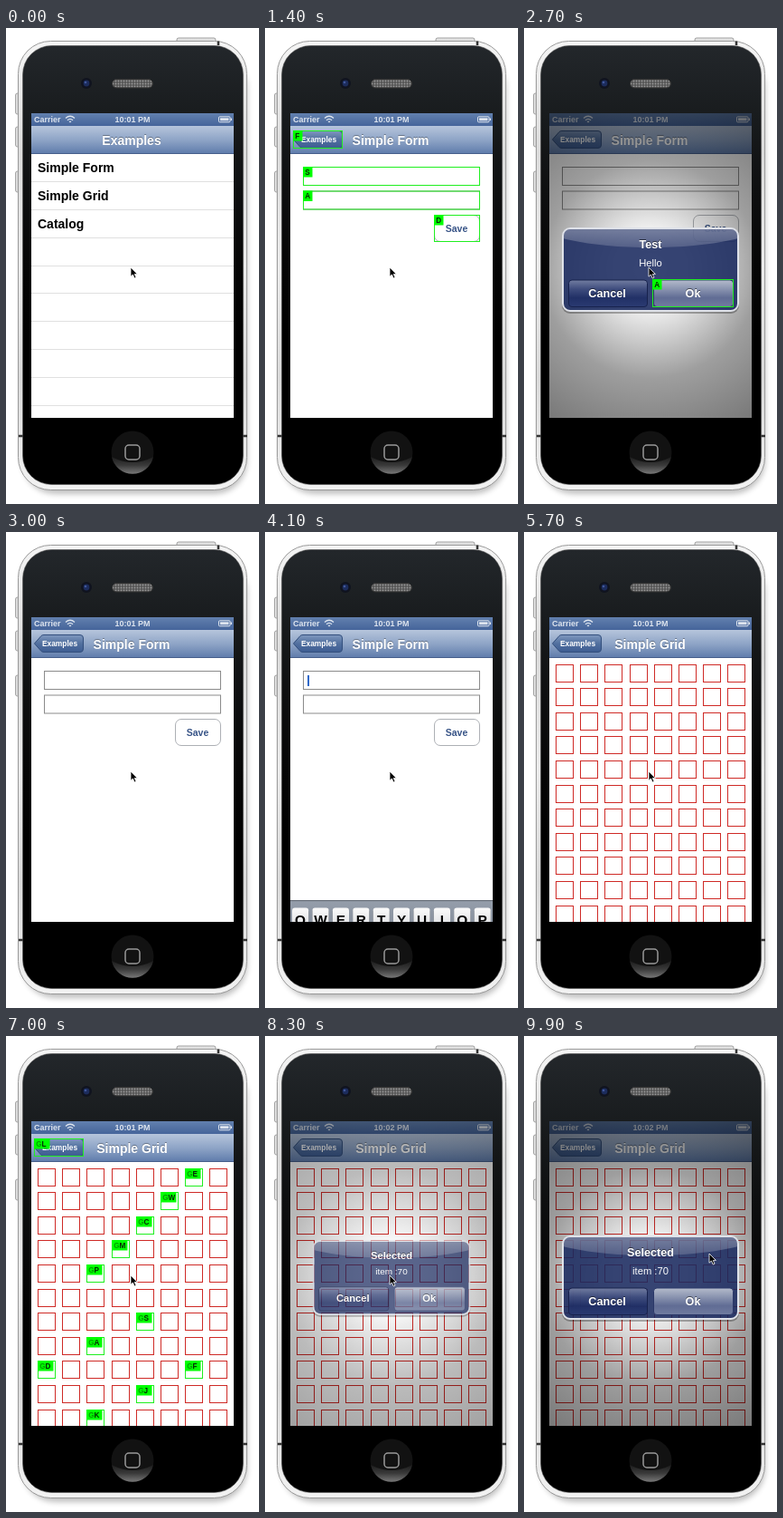
Animation of 280x525 px, one loop 10000 ms. Source, as an HTML page:

```html
<!DOCTYPE html>
<html lang="en">
<head>
<meta charset="utf-8">
<title>Keyboard hints on a phone</title>
<style>
html, body { margin: 0; width: 100%; height: 100%; overflow: hidden; background: #fff; }
svg {
  display: block;
  --form: 0; --grid: 0; --keys: 0; --caret: 0; --late: 0;
  --dim: 0; --alert: 0; --scale: 1; --picked: 0;
  --listHints: 0; --formHints: 0; --alertHints: 0; --cancelHint: 1; --gridHints: 0; --typed: 0;
  --x: 138px; --y: 264px;
  animation: play 10s step-end infinite;
}
text { font-family: "Liberation Sans", Arial, Helvetica, sans-serif; font-weight: bold; }
.mid { text-anchor: middle; }
.title { font-size: 14px; fill: #fff; text-shadow: 0 -1px 0 #0005; }
.row { font-size: 14px; }
.status { font-size: 9px; fill: #dde4ee; }
.box { fill: #fff; stroke: #8b8b8b; }
.cell { fill: #fff; stroke: #cf2a26; }
.frame { fill: none; stroke: #1fef1f; }
.tag { fill: #0f0; }
.tagText { font-size: 8.2px; fill: #052b05; }
.button { font-size: 12.6px; fill: #fff; text-shadow: 0 -1px 0 #0008; }
.body { font-size: 11.2px; font-weight: normal; fill: #fff; }

#list { transform: translateX(calc((var(--form) + var(--grid)) * -224px)); }
#form { transform: translateX(calc((1 - var(--form)) * 224px)); }
#grid { transform: translateX(calc((1 - var(--grid)) * 224px)); }
#keyboard { transform: translateY(calc((1 - var(--keys)) * 151px)); }
#caret { opacity: var(--caret); }
#homeTitle { opacity: calc(1 - var(--form) - var(--grid)); transform: translateX(calc((var(--form) + var(--grid)) * -80px)); }
#formTitle { opacity: var(--form); transform: translateX(calc((1 - var(--form)) * 80px)); }
#gridTitle { opacity: var(--grid); transform: translateX(calc((1 - var(--grid)) * 80px)); }
#back { opacity: calc(var(--form) + var(--grid)); transform: translateX(calc((1 - var(--form) - var(--grid)) * 70px)); }
#listHints { opacity: var(--listHints); }
#formHints { opacity: var(--formHints); }
#gridHints { opacity: var(--gridHints); }
#alertHints { opacity: var(--alertHints); }
#cancelHint { opacity: var(--cancelHint); }
.other { opacity: calc(1 - var(--typed)); }
.prefix { fill-opacity: calc(1 - var(--typed) * .55); }
#dim { opacity: var(--dim); }
#alert { opacity: var(--alert); transform: translate(140px, 267px) scale(var(--scale)) translate(-140px, -267px); }
.first { opacity: calc(1 - var(--picked)); }
.second { opacity: var(--picked); }
.early { opacity: calc(1 - var(--late)); }
.late { opacity: var(--late); }
#cursor { transform: translate(var(--x), var(--y)); }

/* One percent is a tenth of a second. */
@keyframes play {
  0% { --form: 0; --grid: 0; --keys: 0; --caret: 0; --late: 0; --dim: 0; --alert: 0; --scale: 1; --picked: 0;
       --listHints: 0; --formHints: 0; --alertHints: 0; --cancelHint: 1; --gridHints: 0; --typed: 0;
       --x: 138px; --y: 264px; }
  3% { --listHints: 1; }
  7% { --listHints: 0; }
  8% { --form: .1; }
  9% { --form: .5; }
  10% { --form: .9; }
  11% { --form: 1; }
  13% { --formHints: 1; }
  15% { --formHints: 0; --alert: .4; --scale: .4; --dim: .15; }
  16% { --alert: .75; --scale: 1.1; --dim: .4; }
  17% { --alert: .82; --scale: .89; --dim: .7; }
  18% { --alert: 1; --scale: 1; --dim: 1; }
  22% { --alertHints: 1; }
  27% { --cancelHint: 0; }
  29% { --alertHints: 0; --alert: .5; --dim: .5; }
  30% { --alert: 0; --dim: 0; }
  36% { --formHints: 1; }
  39% { --formHints: 0; --caret: 1; }
  40% { --keys: .02; }
  41% { --keys: .165; }
  42% { --keys: .7; }
  43% { --keys: 1; --form: 1; }
  44% { --form: .9; }
  45% { --form: .5; }
  46% { --form: .1; }
  47% { --form: 0; --keys: 0; --caret: 0; }
  49% { --listHints: 1; }
  53% { --listHints: 0; }
  54% { --grid: .1; }
  55% { --grid: .5; }
  56% { --grid: .9; }
  57% { --grid: 1; }
  60% { --gridHints: 1; }
  70% { --typed: 1; }
  81% { --gridHints: 0; --late: 1; --picked: 1; --alert: .4; --scale: .4; --dim: .15; }
  82% { --alert: .75; --scale: 1.1; --dim: .4; }
  83% { --alert: .82; --scale: .89; --dim: .7; }
  84% { --alert: 1; --scale: 1; --dim: 1; }
  89% { --x: 149px; --y: 277px; }
  91% { --x: 157px; --y: 276px; }
  92% { --x: 167px; --y: 272px; }
  93% { --x: 178px; --y: 266px; }
  94% { --x: 188px; --y: 258px; }
  95% { --x: 195px; --y: 251px; }
  98% { --x: 201px; --y: 244px; }
  99% { --x: 205px; --y: 240px; }
}
</style>
</head>
<body>
<svg width="280" height="525" viewBox="0 0 280 525">
  <defs id="paints"></defs>
  <defs>
    <clipPath id="screen"><rect x="28" y="94" width="224" height="336"/></clipPath>
    <clipPath id="panel"><rect x="44" y="222" width="192" height="89" rx="7"/></clipPath>
    <radialGradient id="vignette" gradientUnits="userSpaceOnUse" cx="140" cy="266" r="200">
      <stop offset="0" stop-opacity="0"/>
      <stop offset=".2" stop-opacity=".04"/>
      <stop offset=".6" stop-opacity=".38"/>
      <stop offset="1" stop-opacity=".53"/>
    </radialGradient>
    <filter id="soft" x="-20%" y="-20%" width="140%" height="140%"><feGaussianBlur stdDeviation="3"/></filter>
    <pattern id="mesh" width="3" height="3" patternUnits="userSpaceOnUse">
      <rect width="3" height="3" fill="#555"/><circle cx="1.5" cy="1.5" r=".9" fill="#999"/>
    </pattern>
  </defs>

  <rect x="18" y="30" width="249" height="484" rx="37" fill="#000" opacity=".25" filter="url(#soft)"/>
  <rect x="189" y="11" width="43" height="7" rx="2" fill="url(#metal)" stroke="#888" stroke-width=".8"/>
  <g fill="#dcdcdc" stroke="#8a8a8a" stroke-width=".7">
    <rect x="10.5" y="72" width="6" height="23" rx="2"/>
    <rect x="10.5" y="109" width="6" height="22" rx="2"/>
    <rect x="10.5" y="158" width="6" height="23" rx="2"/>
  </g>
  <rect x="13.5" y="14.5" width="253" height="495" rx="36" fill="url(#metal)" stroke="#999"/>
  <path d="M14 450H19M262 450H267M235 14.5V19" stroke="#333" stroke-width="2.5"/>
  <rect x="18.5" y="19.5" width="244" height="484" rx="32" fill="url(#glass)" stroke="#555" stroke-width=".6"/>
  <circle cx="89" cy="61" r="6" fill="#10131f"/>
  <circle cx="89" cy="61" r="3.4" fill="#1c2c5c"/>
  <circle cx="88" cy="60" r="1.3" fill="#40569a"/>
  <rect x="117.5" y="56.5" width="45" height="9.5" rx="4.7" fill="url(#mesh)" stroke="#333"/>
  <circle cx="140" cy="468" r="23.5" fill="#121212"/>
  <path d="M117 473Q140 485 163 473A23.5 23.5 0 0 1 117 473Z" fill="url(#home)"/>
  <rect x="132" y="460" width="16" height="16" rx="4" fill="none" stroke="#999" stroke-width="1.5"/>

  <g clip-path="url(#screen)">
    <rect x="28" y="94" width="224" height="337" fill="#fff"/>
    <g id="list"></g>
    <g id="form">
      <rect x="28" y="139" width="224" height="292" fill="#fff"/>
      <rect class="box" x="42.5" y="153.5" width="195" height="20"/>
      <rect class="box" x="42.5" y="180" width="195" height="20"/>
      <rect class="box" x="187.5" y="206.5" width="50" height="29" rx="6.5" style="stroke:#adb0b5"/>
      <text class="mid" x="212" y="225" font-size="10.5" fill="#385487">Save</text>
      <rect id="caret" x="47" y="158" width="2" height="12" fill="#2f69c9"/>
      <g id="keyboard"></g>
    </g>
    <g id="grid"></g>

    <rect x="28" y="94" width="224" height="14" fill="url(#statusBar)"/>
    <text class="status" x="31" y="104">Carrier</text>
    <g fill="none" stroke="#dde4ee" stroke-width="1.3">
      <path d="M66 99.5Q71 95 76 99.5M68 101.7Q71 99 74 101.7"/>
      <rect x="235.5" y="97.8" width="12.5" height="6" rx="1" stroke-width="1"/>
    </g>
    <path d="M69.5 103L71 104.6L72.5 103Q71 101.8 69.5 103M237 99.3H246.5V102.3H237ZM248.5 99.5H250V102H248.5Z" fill="#dde4ee"/>
    <text class="status mid early" x="140" y="104">10:01 PM</text>
    <text class="status mid late" x="140" y="104">10:02 PM</text>

    <rect x="28" y="108" width="224" height="31" fill="url(#navBar)"/>
    <path d="M28 138.5H252" stroke="#465f8b"/>
    <text id="homeTitle" class="title mid" x="139" y="129">Examples</text>
    <text id="formTitle" class="title mid" x="139" y="129">Simple Form</text>
    <text id="gridTitle" class="title mid" x="139.5" y="129">Simple Grid</text>
    <g id="back">
      <path d="M31.5 123L39 114.5Q40 113.5 42 113.5H82Q85.5 113.5 85.5 117V129Q85.5 132.5 82 132.5H42Q40 132.5 39 131.5Z" fill="url(#backFill)" stroke="#334f7d"/>
      <text class="mid" x="59.5" y="126" font-size="8.4" fill="#fff">Examples</text>
    </g>

    <g id="listHints"></g>
    <g id="formHints"></g>
    <g id="gridHints"></g>

    <rect id="dim" x="28" y="94" width="224" height="337" fill="url(#vignette)"/>
    <g id="alert">
      <rect x="42" y="221" width="196" height="94" rx="9" fill="#000" opacity=".3"/>
      <rect x="43" y="221" width="194" height="91" rx="8" fill="#1c2d66" fill-opacity=".82" stroke="#dfe2e9" stroke-width="2"/>
      <ellipse cx="140" cy="215" rx="125" ry="27" fill="url(#gloss)" clip-path="url(#panel)"/>
      <rect x="49.5" y="278" width="87" height="29.5" rx="3.5" fill="url(#cancelFill)" stroke="#17224d"/>
      <rect x="143.5" y="278" width="88" height="29.5" rx="3.5" fill="url(#okFill)" stroke="#2b3868"/>
      <text class="button mid first" x="140" y="243">Test</text>
      <text class="button mid second" x="140" y="243">Selected</text>
      <text class="body mid first" x="140" y="263">Hello</text>
      <text class="body mid second" x="140" y="263">item :70</text>
      <text class="button mid" x="92" y="296.5">Cancel</text>
      <text class="button mid" x="187" y="296.5">Ok</text>
      <g id="alertHints"><g id="cancelHint"></g><g id="okHint"></g></g>
    </g>
  </g>
  <path id="cursor" d="M0 0V10.2L2.4 8L4.2 12L6 11.2L4.3 7.4H7.4Z" fill="#000" stroke="#fff" stroke-width=".8"/>
</svg>
<script>
const fill = (id, parts) => { document.getElementById(id).innerHTML = [].concat(parts).join(""); };
const range = n => [...Array(n).keys()];
const rect = (x, y, w, h, attrs) => `<rect x="${x}" y="${y}" width="${w}" height="${h}" ${attrs}/>`;

const gradient = (id, ...stops) =>
  `<linearGradient id="${id}" x2="0" y2="1">${stops.map((color, i) =>
    `<stop offset="${i / (stops.length - 1)}" stop-color="${color}"/>`).join("")}</linearGradient>`;

fill("paints", [
  gradient("metal", "#f4f4f4", "#dcdcdc", "#ececec", "#dadada", "#f2f2f2"),
  gradient("glass", "#23272b", "#181b1d", "#0e0f10", "#060606", "#000", "#000", "#000"),
  gradient("home", "#1c1c1c", "#3a3a3a", "#777"),
  gradient("statusBar", "#6280ae", "#45649a"),
  gradient("navBar", "#b6c5dc", "#8ea4c6", "#5e7bab"),
  gradient("backFill", "#7f98be", "#52709f", "#3d5c92"),
  gradient("gloss", "#ffffff70", "#ffffff60", "#ffffff28"),
  gradient("cancelFill", "#7b86a8e0", "#414f80e0", "#1f2e65e0", "#2a3a72e0"),
  gradient("okFill", "#b4bbcb", "#8a94b0", "#606c94", "#717ca0"),
  gradient("keyboardFill", "#959eab", "#6f7885", "#4c535f"),
  gradient("keyFill", "#fafafa", "#d6d8dc")
]);

const hint = (x, y, w, h, label, type = "") => {
  const [lead, rest] = label.length > 1 ? [label[0], label.slice(1)] : ["", label];
  return `<g class="${type}">` + rect(x + .5, y + .5, w - 1, h - 1, 'class="frame"') +
    rect(x, y, lead ? 17.5 : 10.5, 11.5, 'class="tag"') +
    `<text class="tagText" x="${x + 2.2}" y="${y + 8.8}"><tspan class="prefix">${lead}</tspan>${rest}</text></g>`;
};

// Short labels first, then two-letter ones, dealt into buckets so equal prefixes spread out.
function hintLabels(count) {
  const letters = "SADFJKLEWCMPGH", base = letters.length;
  const short = count > base ? Math.floor((base * base - count) / base) : count;
  const labels = range(count).map(i => {
    if (i < short) return letters[i];
    const n = short * base + i - short;
    return letters[Math.floor(n / base)] + letters[n % base];
  });
  return range(base).flatMap(b => labels.filter((_, i) => i % base === b));
}

const rowHeight = 30.8;
fill("list", [
  ...["Simple Form", "Simple Grid", "Catalog"].map((name, i) =>
    `<text class="row" x="35" y="${159 + i * rowHeight}">${name}</text>`),
  ...range(9).map(i => rect(28, Math.round(169.2 + i * rowHeight), 224, 1, 'fill="#e0e0e0"'))
]);
fill("listHints", [..."DAS"].map((label, i) => hint(28, Math.round(139 + i * rowHeight), 224, 31, label)));

fill("formHints", [
  hint(42, 153, 196, 21, "S"), hint(42, 179.5, 196, 21, "A"),
  hint(187, 206, 51, 30, "D"), hint(31, 113, 55, 20, "F")
]);
fill("cancelHint", hint(49, 277, 88, 31, "S"));
fill("okHint", hint(142, 277, 90, 31, "A"));

const cells = range(88).map(i => [
  Math.floor(35.6 + i % 8 * 27.15),
  Math.round(145.6 + Math.floor(i / 8) * 26.6)
]);
fill("grid", [
  rect(28, 139, 224, 292, 'fill="#fff"'),
  ...cells.map(([x, y]) => rect(x + .5, y + .5, 19, 19, 'class="cell"'))
]);
fill("gridHints", hintLabels(89).map((label, i) => {
  const type = label[0] === "G" ? "" : "other";
  return i < 88 ? hint(...cells[i], 20, 20, label, type) : hint(31, 113, 55, 20, label, type);
}));

const key = (x, row, w, label, size = 15.4) => {
  const y = 288.4 + row * 37.8;
  return rect(x, y + 1, w, 28, 'rx="3" fill="#31363e"') + rect(x, y, w, 28, 'rx="3" fill="url(#keyFill)"') +
    `<text class="mid" x="${x + w / 2}" y="${y + 19}" font-size="${size}">${label}</text>`;
};
fill("keyboard", [
  rect(28, 280, 224, 151, 'fill="url(#keyboardFill)"'),
  rect(28, 280, 224, 1, 'fill="#5d646f"'),
  ...["QWERTYUIOP", "ASDFGHJKL", "ZXCVBNM"].flatMap((letters, row) =>
    [...letters].map((c, i) => key(30 + [0, 11.2, 33.6][row] + i * 22.4, row, 18.2, c))),
  key(30, 2, 27, "⇧"), key(222, 2, 28, "⌫", 12),
  key(30, 3, 50, "123", 10), key(84, 3, 112, "space", 10), key(200, 3, 50, "return", 10)
]);
</script>
</body>
</html>
```
